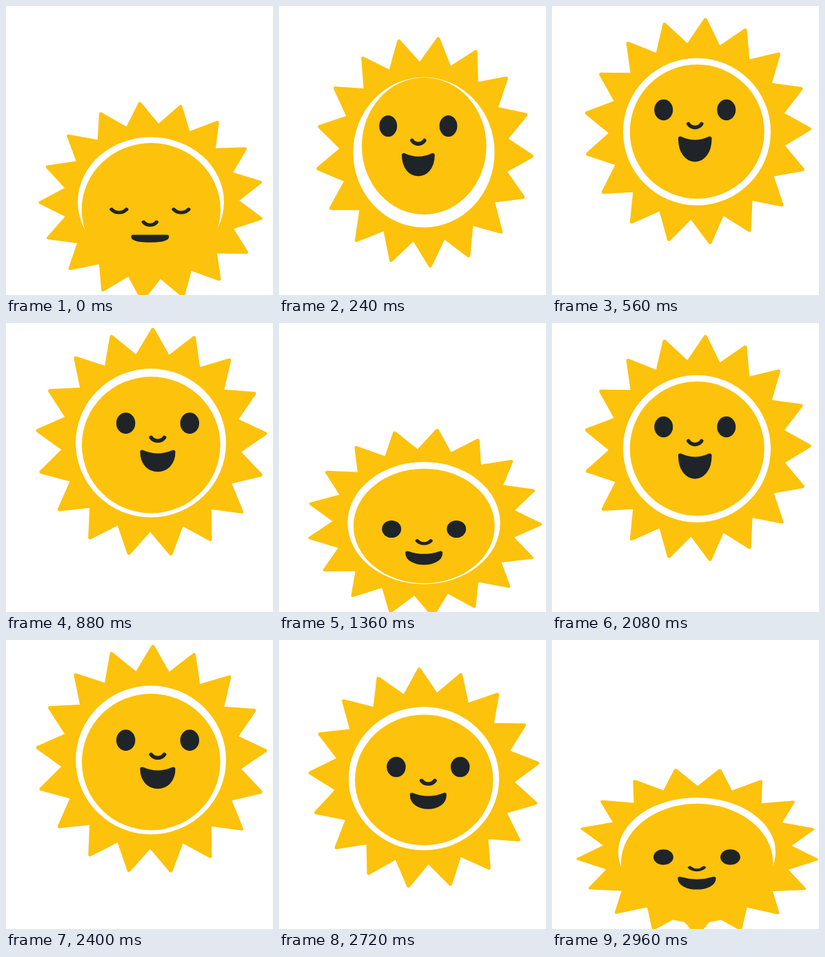
Write an HTML page with a canvas that moves like this. It is 387 by 420 pixels and loops after 3.04 s.

```html
<!DOCTYPE html>
<html lang="en">
<head>
<meta charset="utf-8">
<title>Bouncing sun</title>
<style>
html, body { margin: 0; width: 100%; height: 100%; overflow: hidden; background: #fff; }
canvas { display: block; }
</style>
</head>
<body>
<canvas id="stage" width="387" height="420"></canvas>
<script>
const ctx = document.getElementById('stage').getContext('2d');
const YELLOW = '#fcc20c', DARK = '#1e2427';
const BOUNCE = 1520, STEP = 80, RAYS = 17, TURN = 2 * Math.PI / RAYS;

// Main poses of one bounce; drop and eyes are offsets from the sun's centre y
const asleep = { t: 0, y: 284, sx: .99, sy: .88, drop: 12, eyes: 12 };
const leap = { t: 240, y: 212, sx: .958, sy: 1.02, drop: -8.5, eyes: -37.5 };
const rise = { t: 560, y: 182, sx: 1, sy: 1, drop: .5, eyes: -31 };
const peak = { t: 880, y: 173.7, sx: 1.018, sy: 1.01, drop: 3.5, eyes: -28 };
const fall = { t: 1280, y: 226.4, sx: 1.02, sy: .94, drop: 2, eyes: -5 };
const land = { t: 1360, y: 290, sx: 1.033, sy: .83, drop: 5, eyes: 9.5 };
const squash = { t: 1440, y: 307.5, sx: 1.066, sy: .74, drop: 17, eyes: 8 };
const POSES = [asleep, leap, rise, peak, fall, land, squash, { ...asleep, t: BOUNCE }];

const mix = (a, b, u) => a + (b - a) * u;
const wave = (p, crest) => Math.cos(2 * Math.PI * (p - crest));

// Slows down on the way up, speeds up on the way down
function poseAt(t) {
  const i = POSES.findLastIndex(pose => pose.t <= t);
  const a = POSES[i], b = POSES[i + 1];
  const u = (t - a.t) / (b.t - a.t);
  const eased = b.y < a.y ? 1 - (1 - u) ** 2 : u ** 3;
  const pose = {};
  for (const key in a) pose[key] = mix(a[key], b[key], eased);
  return pose;
}

function ellipse(x, y, rx, ry, color) {
  ctx.fillStyle = color;
  ctx.beginPath();
  ctx.ellipse(x, y, rx, ry, 0, 0, 2 * Math.PI);
  ctx.fill();
}

function curve(x, y, half, drop) {
  ctx.lineWidth = 5.5;
  ctx.beginPath();
  ctx.moveTo(x - half, y);
  ctx.bezierCurveTo(x - half / 2, y + drop, x + half / 2, y + drop, x + half, y);
  ctx.stroke();
}

function drawRays(angle) {
  ctx.beginPath();
  for (let i = 0; i < RAYS * 2; i++) {
    const a = angle + i * TURN / 2, r = i % 2 ? 125 : 162.5;
    ctx.lineTo(r * Math.sin(a), -r * Math.cos(a));
  }
  ctx.closePath();
  ctx.fillStyle = ctx.strokeStyle = YELLOW;
  ctx.lineWidth = 5;
  ctx.fill();
  ctx.stroke();
}

function drawMouth(height, open) {
  const half = 26.5 - .14 * height, top = 41.5 + 3 * (1 - open);
  const bottom = top + (height - 6) * 4 / 3;
  ctx.lineWidth = 6;
  ctx.beginPath();
  ctx.moveTo(-half, top);
  ctx.quadraticCurveTo(0, top + 10 * open, half, top);
  ctx.bezierCurveTo(half, bottom, -half, bottom, -half, top);
  ctx.closePath();
  ctx.fill();
  ctx.stroke();
}

function drawFace(mouth, open) {
  ctx.strokeStyle = ctx.fillStyle = DARK;
  for (const x of [-45.5, 45.5]) {
    if (open) ellipse(x, 0, 13.5, 15.2 * open, DARK);
    else curve(x, -.5, 11, 7);
  }
  curve(0, 20.5, 9.5, 6.5);
  drawMouth(mouth, open);
}

function scaled(x, y, sx, sy, draw) {
  ctx.save();
  ctx.translate(x, y);
  ctx.scale(sx, sy);
  draw();
  ctx.restore();
}

function render(now) {
  const t = Math.floor(now / STEP) * STEP % BOUNCE, p = t / BOUNCE;
  const { y, sx, sy, drop, eyes } = poseAt(t);
  const angle = (4 * p - .28) * TURN;
  const open = Math.min(1, t / 140);
  const mouth = mix(12.5, 30.5 + 6.5 * wave(p, .35), open);
  const look = -(310 - y) / 12 * wave(p, .16);
  const discX = 97.3 + .36 * drop, discY = 97.5 + 1.4 * Math.max(0, drop - 3);

  ctx.clearRect(0, 0, 387, 420);
  ctx.lineCap = ctx.lineJoin = 'round';
  scaled(210.7, y, sx, sy, () => drawRays(angle));
  ellipse(210, y + .7, 107 * sx, 107 * sy, '#fff');
  ellipse(210.3, y + drop, discX * sx, discY * sy, YELLOW);
  scaled(210 + look, y + eyes, sx, sy, () => drawFace(mouth, open));
}

const start = performance.now();
function tick() {
  render(performance.now() - start);
  requestAnimationFrame(tick);
}
tick();
</script>
</body>
</html>
```
